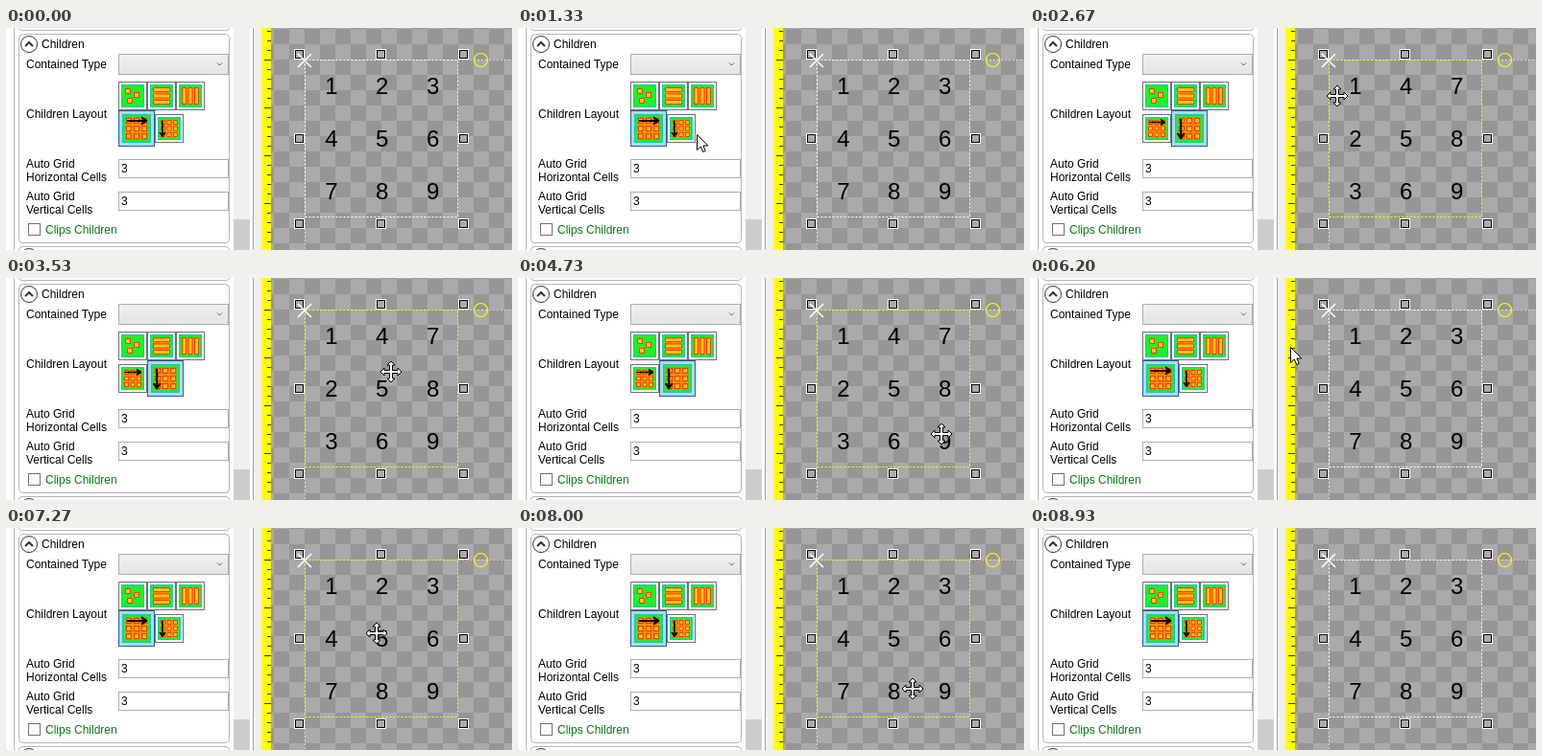
Write an HTML page that moves like this. It is 527 px wide and 232 px high and loops after 9800 ms.

```html
<!DOCTYPE html>
<html>
<head>
<meta charset="utf-8">
<style>
html, body { margin: 0; width: 100%; height: 100%; overflow: hidden; background: #fff; }
svg { display: block; font: 12px "Liberation Sans", Arial, sans-serif; }
#digits { font-size: 24px; text-anchor: middle; }
.field { fill: #fff; stroke: #abadb3; }
.btn { fill: #fff; stroke: #707070; }
.hover .btn { fill: #e3f1fb; stroke: #3c7fb1; }
.down .btn, .chosen .btn { fill: #a9d8f8; stroke: #2c628b; }
.cell { fill: #ffc800; stroke: #f03c14; }
.arrow { fill: none; stroke: #000; stroke-width: 1.6; }
.ptr { fill: #fff; stroke: #000; }
</style>
</head>
<body>
<svg width="527" height="232" viewBox="0 0 527 232">
  <defs>
    <pattern id="checks" x="311" y="33" width="32" height="32" patternUnits="userSpaceOnUse">
      <path fill="#aaa" d="M0 0H32V32H0Z"/>
      <path fill="#969696" d="M0 0H16V16H0ZM16 16H32V32H16Z"/>
    </pattern>
    <pattern id="ticks" x="266" y="33" width="10" height="50" patternUnits="userSpaceOnUse">
      <path fill="#ff0" d="M0 0H10V50H0Z"/>
      <path stroke="#333" d="M3 .5H10M6 10.5H10M6 20.5H10M6 30.5H10M6 40.5H10"/>
    </pattern>
    <linearGradient id="combo" x2="0" y2="1">
      <stop stop-color="#f0f0f0"/><stop offset="1" stop-color="#e4e4e4"/>
    </linearGradient>
    <g id="frame"><path fill="#18c8b4" d="M0 0H24V24H0Z"/><path fill="#1cf02c" d="M1 1H23V23H1Z"/></g>
    <g id="free"><use href="#frame"/><path class="cell" d="M4.500 4.500h5v5h-5zM13.500 8.500h5v5h-5zM6.500 14.500h5v5h-5z"/></g>
    <g id="rows"><use href="#frame"/><path fill="#ff9000" d="M3 3H21V21H3Z"/><path class="cell" d="M3.500 3.500h17v4h-17zM3.500 10h17v4h-17zM3.500 16.500h17v4h-17z"/></g>
    <g id="cols"><use href="#rows" transform="matrix(0 1 1 0 0 0)"/></g>
    <g id="grid"><use href="#frame"/><path fill="#ff9000" d="M3 3H21V21H3Z"/><path class="cell" id="cells"/></g>
  </defs>

  <!-- property panel -->
  <g fill="none" stroke="#b4b4b4">
    <path d="M8.500 0V232M13.500 0Q13.500 2.500 17 2.500H229Q232.500 2.500 232.500 0"/>
    <rect x="13.500" y="6.500" width="219" height="218" rx="4"/>
    <path d="M13.500 232Q13.500 228.500 17 228.500H229Q232.500 228.500 232.500 232"/>
  </g>
  <g fill="#fff" stroke="#333">
    <circle cx="24" cy="17" r="8.500"/><circle cx="24" cy="239" r="8.500"/>
    <path fill="none" stroke-width="2" d="M20 19L24 15L28 19"/>
  </g>
  <text x="37" y="21">Children</text>
  <text x="21" y="42">Contained Type</text>
  <text x="21" y="94">Children Layout</text>
  <text x="21" y="146">Auto Grid</text>
  <text x="21" y="160">Horizontal Cells</text>
  <text x="21" y="180">Auto Grid</text>
  <text x="21" y="194">Vertical Cells</text>
  <text x="41" y="215" fill="#007a10">Clips Children</text>
  <rect x="117.500" y="27.500" width="114" height="21" fill="url(#combo)" stroke="#acacac"/>
  <path d="M220 36.500L222.500 39L225 36.500" fill="none" stroke="#606060"/>
  <rect class="field" x="117.500" y="137.500" width="114" height="19"/>
  <rect class="field" x="117.500" y="171.500" width="114" height="19"/>
  <text x="120" y="151">3</text>
  <text x="120" y="185">3</text>
  <rect x="23.500" y="204.500" width="12" height="12" fill="#fff" stroke="#707070"/>
  <g id="buttons"></g>

  <!-- scroll bar and splitter -->
  <path fill="#f0f0f0" d="M237 0H254V232H237ZM258 0H266V232H258Z"/>
  <path fill="#cdcdcd" d="M237 200H254V232H237Z"/>
  <path stroke="#a0a0a0" d="M257.500 0V232"/>

  <!-- editor -->
  <rect x="266" width="10" height="232" fill="url(#ticks)"/>
  <rect x="276" width="251" height="232" fill="url(#checks)"/>
  <path d="M311.500 33V232M311 33.500H527" stroke="#fff" stroke-opacity=".55" stroke-dasharray="2 2"/>
  <rect id="outline" x="311.500" y="33.500" width="159" height="164" fill="none" stroke-dasharray="2 2"/>
  <g id="digits"></g>
  <g id="handles"></g>
  <path d="M304 27L318 41M318 27L304 41" stroke="#fff" stroke-width="1.500"/>
  <circle cx="494.500" cy="33.500" r="7" fill="none" stroke="#ff0" stroke-width="1.200"/>

  <path id="arrow" class="ptr" d="M.5 .5V16.500L4.300 13L6.800 18.500L9.300 17.400L6.900 12H11.800Z"/>
  <path id="move" class="ptr" d="M0-11L4-7H1.500V-1.500H7V-4L11 0L7 4V1.500H1.500V7H4L0 11L-4 7H-1.500V1.500H-7V4L-11 0L-7-4V-1.500H-1.500V-7H-4Z"/>
</svg>
<script>
const LOOP = 9800, STEP = 1000 / 15;
const $ = id => document.getElementById(id);
const nine = [...Array(9).keys()];
const ease = k => k * k * (3 - 2 * k);

// one pass along each lane of digits, as [step, x, y] stops
function sweep(first, period, lanes, from, to, vertical) {
  return lanes.flatMap((lane, k) => [from, to].map((along, end) => {
    const step = first + k * period + end * 8;
    return vertical ? [step, lane, along] : [step, along, lane];
  }));
}

const stops = [
  [8, 466, 222], [22, 170, 105], [34, 170, 105],
  ...sweep(37.5, 11.5, [320, 401, 443], 48, 148, true),
  [70, 446, 164], [83, 134, 105], [89, 134, 105],
  ...sweep(94.8, 10, [62, 110, 168], 312, 450, false),
  [124, 440, 172], [129, 440, 172], [134, 230, 226]
];

function pointer(n) {
  const i = stops.findIndex(s => s[0] > n);
  if (i < 1) return null;
  const a = stops[i - 1], b = stops[i];
  const k = ease((n - a[0]) / (b[0] - a[0]));
  return [1, 2].map(j => Math.round(a[j] + (b[j] - a[j]) * k));
}

function button(x, y, size, icon, extra = "", state = "") {
  const pad = size > 30 ? 4 : 3;
  return `<g class="${state}"><rect class="btn" x="${x + .5}" y="${y + .5}" width="${size - 1}" height="${size - 1}"/>
    <g transform="translate(${x + pad} ${y + pad}) scale(${(size - 2 * pad) / 24})"><use href="#${icon}"/>${extra}</g></g>`;
}

const across = '<path class="arrow" d="M4 5.500H20M16 2.500L20 5.500L16 8.500"/>';
const down = '<path class="arrow" d="M5 4V20M2 16L5 20L8 16"/>';
let shown = "";

function showLayout(vertical, state) {
  const key = vertical + state;
  if (key === shown) return;
  shown = key;
  $("buttons").innerHTML =
    ["free", "rows", "cols"].map((icon, i) => button(117 + 30 * i, 56, 30, icon)).join("") +
    (vertical
      ? button(117, 90, 30, "grid", across, state) + button(147, 86, 38, "grid", down, "chosen")
      : button(117, 86, 38, "grid", across, "chosen") + button(155, 90, 30, "grid", down, state));
  $("digits").innerHTML = nine.map(i => {
    const major = Math.floor(i / 3), minor = i % 3;
    const [col, row] = vertical ? [major, minor] : [minor, major];
    return `<text x="${339 + col * 52.8}" y="${69 + row * 55}">${i + 1}</text>`;
  }).join("");
}

function place(id, visible, pos) {
  $(id).style.display = visible ? "" : "none";
  if (visible) $(id).setAttribute("transform", `translate(${pos})`);
}

function draw(t) {
  const n = Math.floor((t + 4) / STEP);
  const pos = pointer(n), [x, y] = pos || [-99, -99];
  const inside = x >= 311 && x <= 470 && y >= 33 && y <= 197;
  const vertical = n >= 28 && n < 88;
  const left = vertical ? 117 : 155;
  const over = x >= left && x < left + 30 && y >= 90 && y < 120;
  const pressed = n >= 25 && n < 28 || n >= 85 && n < 88;
  showLayout(vertical, pressed ? "down" : over ? "hover" : "");
  $("outline").setAttribute("stroke", inside ? "#ff0" : "#fff");
  place("arrow", pos && !inside, pos);
  place("move", pos && inside, pos);
}

$("cells").setAttribute("d", nine.map(i =>
  `M${3.5 + i % 3 * 6.5} ${3.5 + Math.floor(i / 3) * 6.5}h4v4h-4z`).join(""));
$("handles").innerHTML = nine.filter(i => i !== 4).map(i => {
  const x = Math.floor(305 + i % 3 * 85.7), y = Math.floor(27 + Math.floor(i / 3) * 88.7);
  return `<rect x="${x - 5}" y="${y - 5}" width="11" height="11" fill="#fff"/>
    <rect x="${x - 3.5}" y="${y - 3.5}" width="8" height="8" fill="#aaa" stroke="#000"/>`;
}).join("");

const start = performance.now();
function tick() {
  draw((performance.now() - start) % LOOP);
  requestAnimationFrame(tick);
}
tick();
</script>
</body>
</html>
```
